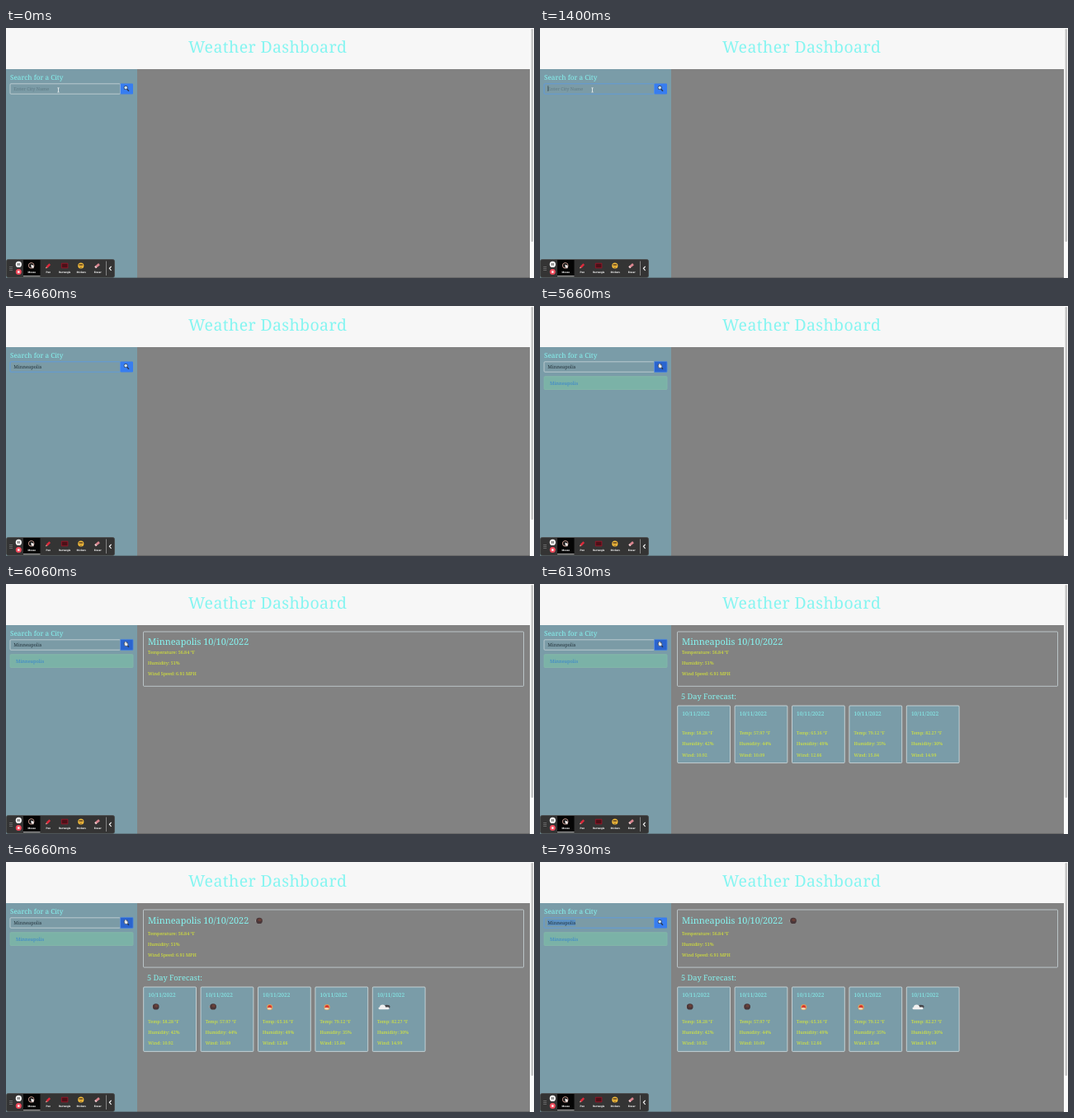
An HTML page with a canvas that plays this animation: 640 px wide and 304 px high, repeating every 8 s.

```html
<!DOCTYPE html>
<html lang="en">
<head>
<meta charset="utf-8">
<title>Weather Dashboard</title>
<style>
  html, body { margin: 0; width: 100%; height: 100%; overflow: hidden; background: #828282; }
  canvas { display: block; }
</style>
</head>
<body>
<canvas id="stage" width="640" height="304"></canvas>
<script>
const ctx = document.getElementById('stage').getContext('2d');
const LOOP = 8000;
const SERIF = '"Noto Serif", serif', SANS = 'Roboto, sans-serif';
const AQUA = '#86f5f1', YELLOW = '#dff02e', SIDE = '#7a9ca8', PALE = '#c9d6da';
ctx.textRendering = 'geometricPrecision';

// [time, value of the search field]
const typed = [[1660, 'M'], [1860, 'Mi'], [2000, 'Min'], [2200, 'Minn'], [2730, 'Minna'], [3000, 'Minn'],
  [3200, 'Minne'], [3260, 'Minnea'], [3600, 'Minneap'], [3660, 'Minneapo'],
  [3930, 'Minneapol'], [4060, 'Minneapoli'], [4200, 'Minneapolis']];
const FOCUS = 1060, HOVER = 4800, CLICK = 5400, LISTED = 5530, CURRENT = 6000,
  FORECAST = 6070, ICONS = 6260, SELECT = 7930;

// temperature, humidity, wind, icon
const days = [['58.28', 42, '10.92', 'moon'], ['57.97', 44, '10.09', 'moon'], ['65.16', 49, '12.66', 'sun'],
  ['79.12', 35, '15.84', 'sun'], ['82.27', 30, '14.99', 'cloud']];

function rect(x, y, w, h, fill, stroke, radius = 0) {
  ctx.beginPath();
  ctx.roundRect(x, y, w, h, radius);
  if (fill) { ctx.fillStyle = fill; ctx.fill(); }
  if (stroke) { ctx.strokeStyle = stroke; ctx.lineWidth = 0.8; ctx.stroke(); }
}
function oval(x, y, rx, ry, fill) {
  ctx.fillStyle = fill;
  ctx.beginPath();
  ctx.ellipse(x, y, rx, ry, 0, 0, 7);
  ctx.fill();
}
function line(points, color, width = 0.8) {
  ctx.strokeStyle = color;
  ctx.lineWidth = width;
  ctx.beginPath();
  points.forEach(([x, y]) => ctx.lineTo(x, y));
  ctx.stroke();
}
// y is the middle of the capital letters
function text(str, x, y, size, color, { font = SERIF, spacing = 0, weight = 400, align = 'left' } = {}) {
  ctx.font = `${weight} ${size}px ${font}`;
  ctx.letterSpacing = spacing + 'px';
  ctx.textAlign = align;
  ctx.fillStyle = color;
  ctx.fillText(str, x, y + size * 0.355);
  return ctx.measureText(str).width;
}

function icon(kind, x, y) {
  if (kind === 'moon') {
    oval(x - 1.5, y + 0.5, 3.4, 2.2, '#a3a09f');
    oval(x, y + 0.4, 3.9, 3.6, '#49373a');
    oval(x + 0.5, y - 0.5, 2.2, 1.8, '#6b4038');
  } else if (kind === 'sun') {
    oval(x, y + 1, 3.6, 3.6, '#dfa05a');
    oval(x, y + 0.8, 2.4, 2.4, '#d8382f');
    oval(x - 0.4, y + 2.8, 2.6, 1.3, '#ecd9ba');
  } else {
    oval(x + 3, y + 0.6, 4, 2.4, '#454549');
    oval(x - 2, y + 0.8, 3.4, 2.8, '#f1f1f1');
    rect(x - 7, y + 1, 13, 2.8, '#f1f1f1', null, 1.4);
  }
}

function page() {
  rect(0, 0, 640, 304, '#828282');
  rect(0, 50, 159, 254, SIDE);
  rect(0, 0, 640, 50, '#f7f7f7');
  rect(635, 0, 5, 304, '#fafafa');
  rect(636.5, 1, 2.5, 259, '#c3c3c3', null, 1.2);
  rect(0, 303, 635, 1, 'rgba(50,50,50,.3)');
  text('Weather Dashboard', 221, 23.5, 19.5, AQUA, { spacing: 0.35 });
  text('Search for a City', 5, 60, 8.2, AQUA, { weight: 500 });
}

function search(t) {
  const key = typed.filter(k => k[0] <= t).pop();
  const value = key ? key[1] : '';
  const focused = t >= FOCUS && t < CLICK || t >= SELECT;
  const hover = t >= HOVER && t < SELECT;
  rect(5, 67.8, 133.5, 12.4, '#7b9ba6', focused ? '#5b9be6' : PALE, 1);
  if (t >= SELECT) rect(9, 70, 34, 7.4, '#5c92c4');
  const width = value ? text(value, 9.3, 73.6, 5.75, '#24343c') : 0;
  if (!value) text('Enter City Name', 9.3, 73.6, 5.5, '#5f7b85');
  if (focused && t < SELECT) {
    const since = t - (key ? key[0] : FOCUS);
    if (since % 1000 < 460) rect(9.6 + width, 70.2, 0.6, 6.8, '#1e2a30');
  }

  rect(138.6, 67.4, 15.4, 13, hover ? '#2a64cf' : '#377df0', t >= CLICK && t < SELECT ? '#4b86e0' : null, 1);
  line([[146.6, 74.2], [149, 76.7]], '#28354f', 1.3);
  oval(145.2, 72.6, 2.5, 2.5, '#34405c');
  oval(145.2, 72.6, 1.8, 1.8, '#cbe4f4');
  if (hover) {
    rect(143.6, 71.8, 4.2, 3.5, '#f4f4f4', '#56606e', 1.2);
    rect(144.4, 70.2, 1.1, 3, '#fff');
  }
  if (t < typed[0][0]) {
    line([[62.3, 72.8], [64.7, 72.8]], '#e8eef0', 0.7);
    line([[63.5, 72.8], [63.5, 78]], '#e8eef0', 0.9);
    line([[62.3, 78], [64.7, 78]], '#e8eef0', 0.7);
  }
  if (t >= LISTED) {
    rect(5, 85.7, 149, 15.8, '#7bb2a7', '#85b9a9', 1);
    text('Minneapolis', 12, 93.6, 5.75, '#3583cf');
  }
}

function weather(t) {
  const loaded = t >= ICONS;
  if (t >= CURRENT) {
    const shift = loaded ? 3.8 : 0;
    rect(166.5, 58, 461, 66.3 + shift, null, PALE, 1);
    text('Minneapolis 10/10/2022', 172, loaded ? 71 : 70, 10.9, AQUA);
    ['Temperature: 56.84 °F', 'Humidity: 51%', 'Wind Speed: 6.91 MPH'].forEach((label, i) =>
      text(label, 172, 83 + shift + i * 13.2, 5.45, YELLOW));
    if (loaded) icon('moon', 307, 71);
  }
  if (t < FORECAST) return;
  const top = loaded ? 152 : 148;
  text('5 Day Forecast:', 171, top - 11.5, 9.3, AQUA);
  days.forEach(([temp, humidity, wind, kind], i) => {
    const x = 166.7 + i * 69.4;
    rect(x, top, 63.8, loaded ? 78.4 : 69.6, SIDE, '#d5e0e3', 1);
    text('10/11/2022', x + 5.6, top + 9.2, 6.6, AQUA);
    [`Temp: ${temp} °F`, `Humidity: ${humidity}%`, `Wind: ${wind}`].forEach((label, row) =>
      text(label, x + 5.6, (loaded ? 194 : 181.3) + row * 13.2, 5.4, YELLOW));
    if (loaded) icon(kind, x + (kind === 'moon' ? 15 : 14.2), 175.5);
  });
}

function toolbar() {
  rect(0.5, 281.5, 131, 21.8, '#343434', '#4a4a4a', 2);
  rect(21, 282, 20.5, 20.5, '#050505');
  rect(21, 301.3, 20.5, 1, '#d9d9d9');
  for (let i = 0; i < 6; i++) oval(5 + i % 2 * 2, 290.4 + (i >> 1) * 2, 0.5, 0.5, '#bbb');
  oval(15.3, 287.4, 3.6, 3.6, '#fff');
  rect(14, 286, 0.9, 2.8, '#333');
  rect(15.8, 286, 0.9, 2.8, '#333');
  oval(15.3, 296.6, 3.5, 3.5, '#ee4a5b');
  rect(14.1, 295.4, 2.4, 2.4, '#fff');

  ['Mouse', 'Pen', 'Rectangle', 'Stickers', 'Eraser'].forEach((label, i) =>
    text(label, 31.2 + i * 20, 296.4, 3.15, '#fff', { font: SANS, weight: 700, align: 'center' }));
  oval(30.7, 288.8, 3.6, 3.6, '#d9a79b');
  oval(30.7, 288.8, 2.8, 2.8, '#161616');
  ctx.fillStyle = '#fff';
  ctx.fill(new Path2D('M30.4 287.6l4 2-1.7.6 1 1.6-.9.6-1-1.7-1 1.2z'));
  line([[49.4, 291], [53.2, 287.2]], '#dc2b3c', 2.5);
  line([[48.4, 292], [49.5, 290.9]], '#f0b7a5', 1.2);
  rect(67.3, 286.2, 7.6, 5.6, '#4c1118', '#a5152a');
  oval(90.8, 289, 3.6, 3.6, '#f3bd3b');
  rect(88.3, 287.3, 5, 1.4, '#5b3b20', null, 0.6);
  line([[89.2, 290.4], [90.8, 291.3], [92.4, 290.4]], '#70451d', 0.7);
  line([[108.4, 291], [113, 287.2]], '#d9858f', 2.8);
  line([[108.1, 291.2], [109.4, 290.2]], '#f0d3d5', 2.6);
  rect(121.3, 283.5, 0.6, 17.5, '#bbb');
  line([[127.6, 289.8], [125.4, 292.3], [127.6, 294.8]], '#fff', 1.1);
}

function frame(now) {
  const t = now % LOOP;
  page();
  search(t);
  weather(t);
  toolbar();
  requestAnimationFrame(frame);
}
frame(performance.now());
</script>
</body>
</html>
```
